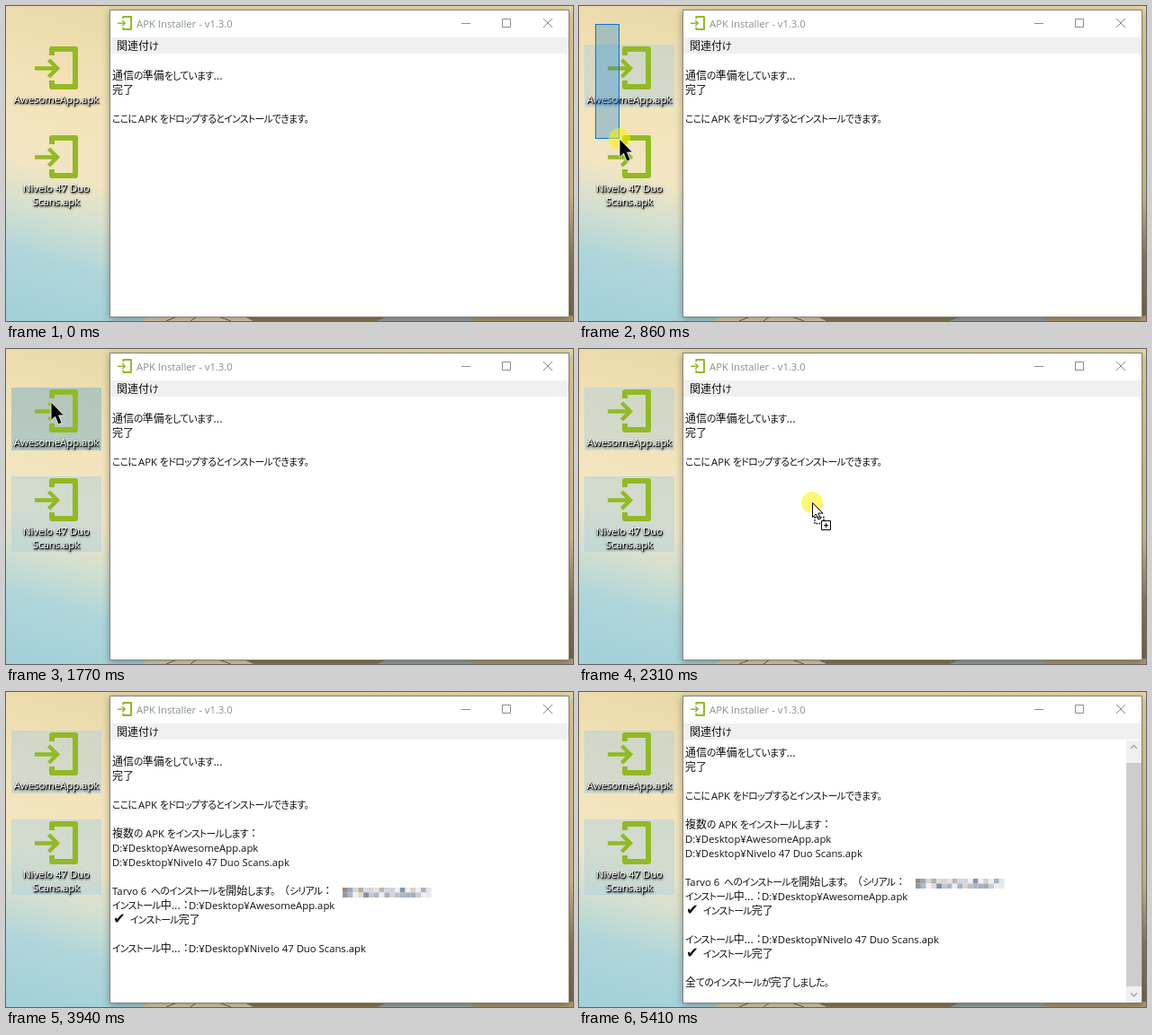
Recreate the animation shown at these times as an HTML page. Size 630x351 px, loop 7410 ms.

```html
<!DOCTYPE html>
<html lang="ja">
<head>
<meta charset="utf-8">
<title>Installer demo</title>
<style>
  html, body { margin: 0; width: 100%; height: 100%; overflow: hidden; background: #ecdcae; }
  svg { display: block; }
  text { font: 11.3px 'Open Sans', 'Noto Sans', sans-serif; fill: #111; white-space: pre; }
  .jp { font: 12px 'Noto Sans CJK JP', 'Noto Sans CJK', sans-serif; }
  .kana { font-size: 10.8px; letter-spacing: -.65px; font-feature-settings: 'palt'; }
  .check { font: bold 16.5px 'DejaVu Sans', sans-serif; }
  .label text { fill: #fff; text-anchor: middle; filter: drop-shadow(1px 1px .6px #000) drop-shadow(0 1px 1px #000c); }
  .glyph { fill: none; stroke: #93b924; }
  .frame { filter: drop-shadow(0 2px 4px #0005); }
  .pick { fill: #b4d2dc; fill-opacity: .5; stroke: #b4d8ee; stroke-opacity: .6; }
  .pick.hover { fill: #92b9c3; fill-opacity: .62; stroke: #8fc0de; }
</style>
</head>
<body>
<svg width="630" height="351" viewBox="0 0 630 351">
  <defs>
    <linearGradient id="sky" gradientUnits="userSpaceOnUse" x1="105" y1="0" x2="10" y2="340">
      <stop offset="0" stop-color="#e9d9a8"/>
      <stop offset=".3" stop-color="#f3e3b8"/>
      <stop offset=".54" stop-color="#f1e5c3"/>
      <stop offset=".68" stop-color="#d3dfd0"/>
      <stop offset=".82" stop-color="#afd6da"/>
      <stop offset="1" stop-color="#a3d0d9"/>
    </linearGradient>
    <linearGradient id="edge" x2="0" y2="1">
      <stop offset="0" stop-color="#e8d8a6"/>
      <stop offset=".6" stop-color="#d6c295"/>
      <stop offset=".8" stop-color="#8f7f62"/>
      <stop offset="1" stop-color="#75684f"/>
    </linearGradient>
    <g id="door" class="glyph">
      <path d="M51 55V48H77V90H51V83" stroke-width="6" stroke-linejoin="round"/>
      <path d="M32 69.5H57M47.5 60L57 69.5L47.5 79" stroke-width="4.4"/>
    </g>
    <g id="file1" class="label">
      <use href="#door"/>
      <text x="56" y="108">AwesomeApp.apk</text>
    </g>
    <g id="file2" class="label">
      <use href="#door" y="99"/>
      <text x="56" y="207">Nivelo 47 Duo</text>
      <text x="56" y="222">Scans.apk</text>
    </g>
  </defs>

  <rect width="630" height="351" fill="url(#sky)"/>
  <rect x="400" width="230" height="351" fill="url(#edge)"/>
  <path d="M150 351L162 345H262L275 351Z" fill="#ddd2ac"/>
  <path d="M178 351L190 346M205 351L212 346M236 346L250 351" stroke="#6d6148" fill="none"/>
  <path d="M262 345H425L412 351H275Z" fill="#8f7c52"/>
  <path d="M425 345H515L520 351H412Z" fill="#9aa6a0"/>
  <path d="M515 345H630V351H520Z" fill="#b09a70"/>

  <rect id="pick1" class="pick" x="6.5" y="43.5" width="99" height="69"/>
  <rect id="pick2" class="pick" x="6.5" y="142.5" width="99" height="83"/>
  <use href="#file1"/>
  <use href="#file2"/>

  <rect class="frame" x="115.5" y="4.5" width="510" height="342" fill="#fff" stroke="#85857c"/>
  <rect x="116" y="35" width="509" height="18" fill="#f0f0f0"/>
  <use href="#door" transform="translate(113.3 -4) scale(.3333)"/>
  <text x="145" y="24" style="fill:#87938a">APK Installer - v1.3.0</text>
  <path d="M506 19.5H516M551.5 14.5H560.5V23.5H551.5ZM597 14L607 24M607 14L597 24" fill="none" stroke="#8c8c8c"/>
  <g id="menu"></g>
  <g id="log"></g>
  <g id="scrollbar">
    <rect x="608" y="54" width="17" height="292" fill="#f0f0f0"/>
    <rect x="608" y="79" width="17" height="249" fill="#cdcdcd"/>
    <path d="M613 63L616.5 59.5L620 63M613 335.5L616.5 339L620 335.5" fill="none" stroke="#a3a3a3" stroke-width="1.4"/>
  </g>

  <rect id="marquee" x="18.5" y="20.5" fill="#0078d7" fill-opacity=".3" stroke="#0078d7"/>
  <g id="ghost" opacity=".6"><use href="#file1"/><use href="#file2"/></g>
  <g id="pointer">
    <circle id="press" r="12" fill="#fff200" fill-opacity=".55"/>
    <path id="arrow" d="M0 0V20.5L4.6 16.4L8.2 25L12 23.4L8.6 15H14.5Z" fill="#000" stroke="#fff" stroke-width=".8"/>
    <g id="copy">
      <path d="M.5 .5V16.5L4.3 13L7 19L9.4 18L6.8 12H12Z" fill="#fff" stroke="#000"/>
      <rect x="3" y="16.5" width="10" height="7" fill="none" stroke="#000" stroke-width="1.5" stroke-dasharray="1.5 1.5"/>
      <path d="M10.5 20.5H20.5V30.5H10.5Z" fill="#fff" stroke="#000"/>
      <path d="M13 25.5H18M15.5 23V28" stroke="#000"/>
    </g>
  </g>
</svg>
<script>
const LOOP = 7410, SCROLL_AT = 5410;
const $ = id => document.getElementById(id);
const show = (id, on) => { $(id).style.display = on ? '' : 'none'; };

function svg(parent, tag, attrs) {
  const node = document.createElementNS('http://www.w3.org/2000/svg', tag);
  for (const key in attrs) node.setAttribute(key, attrs[key]);
  return parent.appendChild(node);
}

function write(parent, x, y, str) {
  const japanese = /[\u3000-\u9fff]/.test(str);
  const node = svg(parent, 'text', { x, y, class: str === '✔' ? 'check' : japanese ? 'jp' : 'latin' });
  node.innerHTML = str.replace(/[ぁ-ヿ。]+/g, '<tspan class="kana">$&</tspan>');
}

// [row, time it appears, x, text, x, text, ...]
const LINES = [
  [0, 0, 118, '通信の準備をしています...'],
  [1, 0, 118, '完了'],
  [3, 0, 118, 'ここに', 147, 'APK', 171, 'をドロップするとインストールできます。'],
  [5, 2790, 118, '複数の', 155, 'APK', 179, 'をインストールします：'],
  [6, 2860, 118, 'D:¥Desktop¥AwesomeApp.apk'],
  [7, 2860, 118, 'D:¥Desktop¥Nivelo 47 Duo Scans.apk'],
  [9, 2940, 118, 'Tarvo 6', 161, 'へのインストールを開始します。', 303, '（シリアル：'],
  [10, 3010, 118, 'インストール中...：', 203, 'D:¥Desktop¥AwesomeApp.apk'],
  [11, 3940, 119, '✔', 138, 'インストール完了'],
  [13, 3940, 118, 'インストール中...：', 203, 'D:¥Desktop¥Nivelo 47 Duo Scans.apk'],
  [14, 5330, 119, '✔', 138, 'インストール完了'],
  [16, 5410, 118, '全てのインストールが完了しました。']
];
const rows = LINES.map(([row, since, ...parts]) => {
  const node = svg($('log'), 'g', {});
  for (let i = 0; i < parts.length; i += 2) write(node, parts[i], 82 + 16 * row, parts[i + 1]);
  return { row, since, node };
});
write($('menu'), 123, 49, '関連付け');

// Blurred serial number
const serial = rows.find(r => r.row === 9).node;
let seed = 7;
const random = () => (seed = seed * 16807 % 2147483647) / 2147483647;
for (let i = 0; i < 34; i++) {
  const light = 55 + random() * 42, hue = random() < .55 ? 215 : 25;
  svg(serial, 'rect', {
    x: 374 + (i % 17) * 5.8, y: i < 17 ? 218 : 223.5, width: 5.8, height: 5.5,
    fill: `hsl(${hue} 18% ${light}%)`
  });
}

// [time, x, y, mode]
const POINTER = [
  [0, 0, 0, 'none'], [70, 253, 243, 'plain'], [150, 232, 216, 'plain'], [220, 195, 168, 'plain'],
  [300, 150, 122, 'plain'], [380, 104, 82, 'plain'], [450, 66, 54, 'plain'], [530, 38, 34, 'plain'],
  [610, 22, 23, 'plain'], [680, 18, 20, 'select'], [760, 24, 62, 'select'], [860, 45, 148, 'select'],
  [910, 58, 188, 'select'], [990, 68, 215, 'select'], [1070, 75, 230, 'select'], [1140, 79, 237, 'select'],
  [1220, 80, 239, 'select'], [1310, 80, 239, 'plain'], [1390, 78, 220, 'plain'], [1460, 72, 170, 'plain'],
  [1540, 63, 118, 'plain'], [1610, 55, 78, 'plain'], [1690, 51, 62, 'plain'], [1770, 50, 59, 'plain'],
  [1840, 50, 59, 'press'], [1920, 57, 84, 'drag'], [2000, 74, 122, 'drag'], [2080, 102, 154, 'drag'],
  [2150, 160, 178, 'copy'], [2230, 222, 176, 'copy'], [2310, 259, 171, 'copy'], [2390, 270, 167, 'copy'],
  [2460, 280, 162, 'copy'], [2540, 286, 160, 'copy'], [2620, 286, 160, 'plain'], [2790, 0, 0, 'none']
];

function render(t) {
  const [, x, y, mode] = POINTER.findLast(step => step[0] <= t);
  show('pointer', mode !== 'none');
  show('press', mode !== 'plain');
  show('arrow', mode !== 'copy');
  show('copy', mode === 'copy');
  show('ghost', mode === 'drag');
  show('marquee', mode === 'select');
  $('pointer').setAttribute('transform', `translate(${x} ${y})`);
  $('ghost').setAttribute('transform', `translate(${x - 50} ${y - 59})`);
  $('marquee').setAttribute('width', Math.max(0, x - 19));
  $('marquee').setAttribute('height', Math.max(0, y - 21));

  const free = mode === 'plain' || mode === 'press';
  const over = (top, bottom) => free && x > 6 && x < 106 && y > top && y < bottom;
  [['pick1', 760, 43, 113], ['pick2', 910, 142, 226]].forEach(([id, since, top, bottom]) => {
    const hover = over(top, bottom);
    show(id, t >= since || hover);
    $(id).classList.toggle('hover', hover && t >= since);
  });

  rows.forEach(r => { r.node.style.display = t >= r.since ? '' : 'none'; });
  show('scrollbar', t >= SCROLL_AT);
  $('log').setAttribute('transform', `translate(0 ${t >= SCROLL_AT ? -10 : 0})`);
}

const start = performance.now();
function tick() {
  render((performance.now() - start) % LOOP);
  requestAnimationFrame(tick);
}
tick();
</script>
</body>
</html>
```
